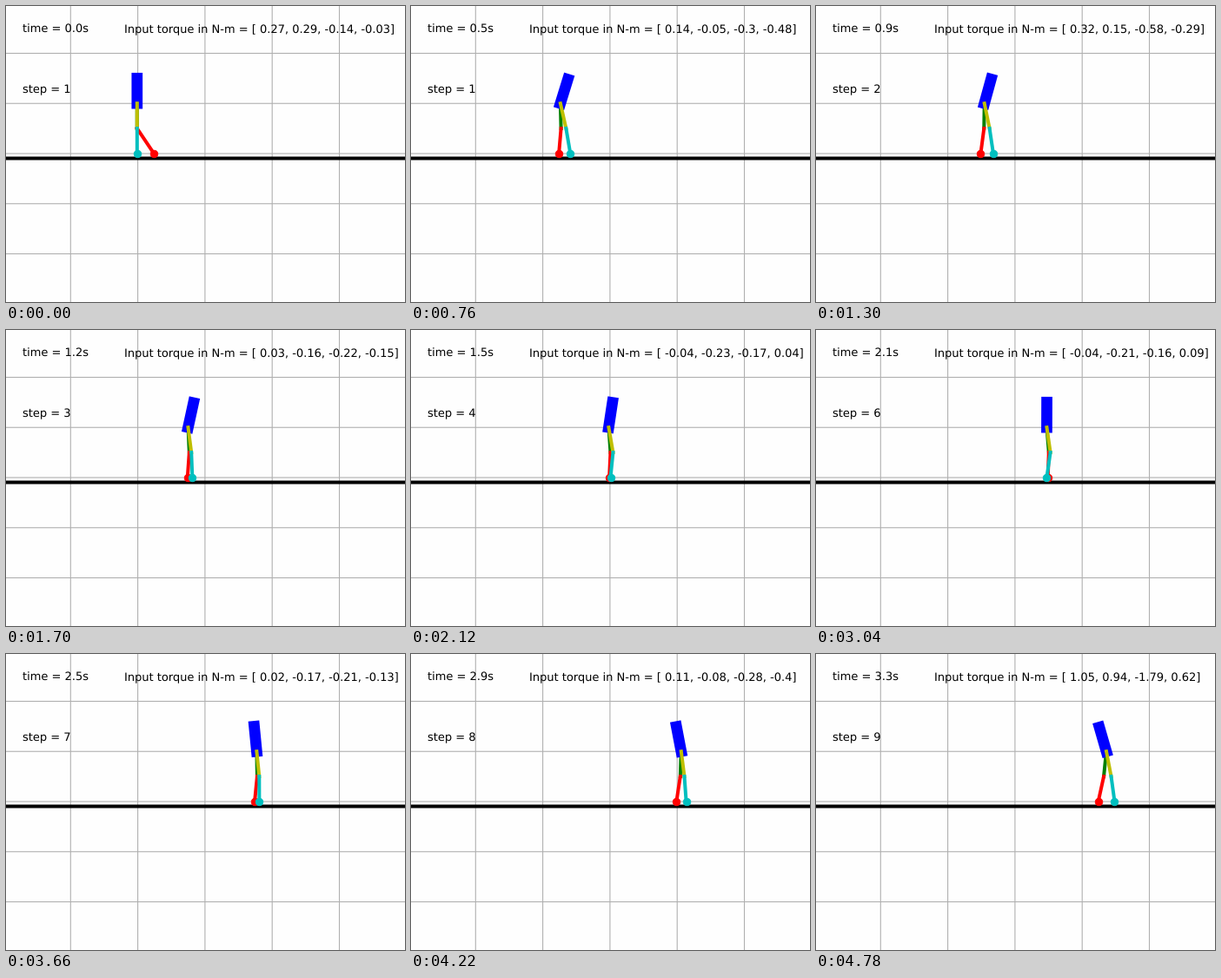
A matplotlib script for the animation above (4800 ms loop, 459 by 341 pixels).

```python
import numpy as np
import matplotlib.pyplot as plt
from matplotlib.animation import FuncAnimation

W, H, DPI = 459, 341, 64
PT = 72 / DPI              # points per pixel
FRAMES, INTERVAL = 240, 20

GRID_X, GRID_Y = 74.3, 54.5
CELL_W, CELL_H = 77.3, 57.75
START_X, STRIDE = 150.8, CELL_W / 4
FOOT_Y = GRID_Y + 2 * CELL_H - 0.1
LINK = CELL_H / 2
KNEE_Y, HIP_Y = FOOT_Y - LINK, FOOT_Y - 2 * LINK

# Joint torques at a few phases of one step
PHASES = [0, 0.5, 0.85, 0.98]
TORQUES = np.array([
    [0.27, 0.29, -0.14, -0.03],
    [-0.06, -0.25, -0.16, 0.10],
    [0.15, -0.04, -0.30, -0.50],
    [1.05, 0.94, -1.79, 0.62],
])

plt.rcParams["text.hinting"] = "none"
fig = plt.figure(figsize=(W / DPI, H / DPI), dpi=DPI, facecolor="#fefefe")
ax = fig.add_axes([0, 0, 1, 1])
ax.set_xlim(0, W)
ax.set_ylim(H, 0)
ax.axis("off")

grid = dict(color="#b0b0b0", lw=1.1 * PT, zorder=0, snap=False)
for k in range(5):
    ax.axvline(GRID_X + CELL_W * k, **grid)
    ax.axhline(GRID_Y + CELL_H * k, **grid)
ax.axhline(175.5, color="k", lw=4 * PT, zorder=1, snap=False)


def link(color, width, order):
    return ax.plot([], [], color=color, lw=width * PT, zorder=order,
                   solid_capstyle="projecting", snap=False)[0]


def foot(color, order):
    return ax.plot([], [], "o", color=color, ms=8.6 * PT, mew=0.8 * PT,
                   zorder=order, snap=False)[0]


def label(x, y):
    return ax.text(x, y, "", family="DejaVu Sans", size=12.95 * PT, va="baseline")


stance_leg = link("g", 4, 2), link("r", 4, 3), foot("r", 4)
torso = link("b", 12.7, 5)
swing_leg = link("y", 4, 6), link("c", 4, 7), foot("c", 8)
time_text, step_text, torque_text = label(19.3, 31), label(19.3, 100), label(135.6, 31)


def settle(n, tau):
    """Rise from 0 to 1 as the walker gets going."""
    return 1 - np.exp(-n / tau)


def steps_walked(n):
    """Steady pace after a slow start, slowest in the middle of each step."""
    t = (n - 18.75 * settle(n, 18.75)) / 24.5
    return t + 0.07 * np.sin(2 * np.pi * t)


def pose_leg(leg, hip, foot_x, bend):
    thigh, shank, ball = leg
    knee = (hip + foot_x) / 2 + bend
    thigh.set_data([hip, knee], [HIP_Y, KNEE_Y])
    shank.set_data([knee, foot_x], [KNEE_Y, FOOT_Y])
    ball.set_data([foot_x], [FOOT_Y])


def update(n):
    walked = steps_walked(n)
    step, phase = int(walked) + 1, walked % 1

    # The legs swap roles at every step, so one is always planted
    stance_x = START_X + STRIDE * step
    swing_x = stance_x + STRIDE * (2 * phase - 1)
    hip = START_X + STRIDE * (walked + 0.5 * settle(n, 55))
    lean = 0.093 * (153 - n) * settle(n, 24)

    stance_bend = 11.4 * settle(n, 8) - 9.7
    swing_bend = (0.8 + 3.4 / (1 + np.exp(40 * (phase - 0.6)))) * settle(n, 8)
    pose_leg(stance_leg, hip, stance_x, stance_bend)
    pose_leg(swing_leg, hip, swing_x, swing_bend)
    torso.set_data([hip, hip + lean],
                   [HIP_Y, HIP_Y - np.sqrt(LINK ** 2 - lean ** 2)])

    torque = [round(float(np.interp(phase, PHASES, joint)), 2) for joint in TORQUES.T]
    time_text.set_text(f"time = {n / 72:.1f}s")
    step_text.set_text(f"step = {step}")
    torque_text.set_text("Input torque in N-m = [ " + ", ".join(map(str, torque)) + "]")
    return (*stance_leg, torso, *swing_leg, time_text, step_text, torque_text)


anim = FuncAnimation(fig, update, frames=FRAMES, interval=INTERVAL,
                     repeat=True, repeat_delay=0)
plt.show()
```
